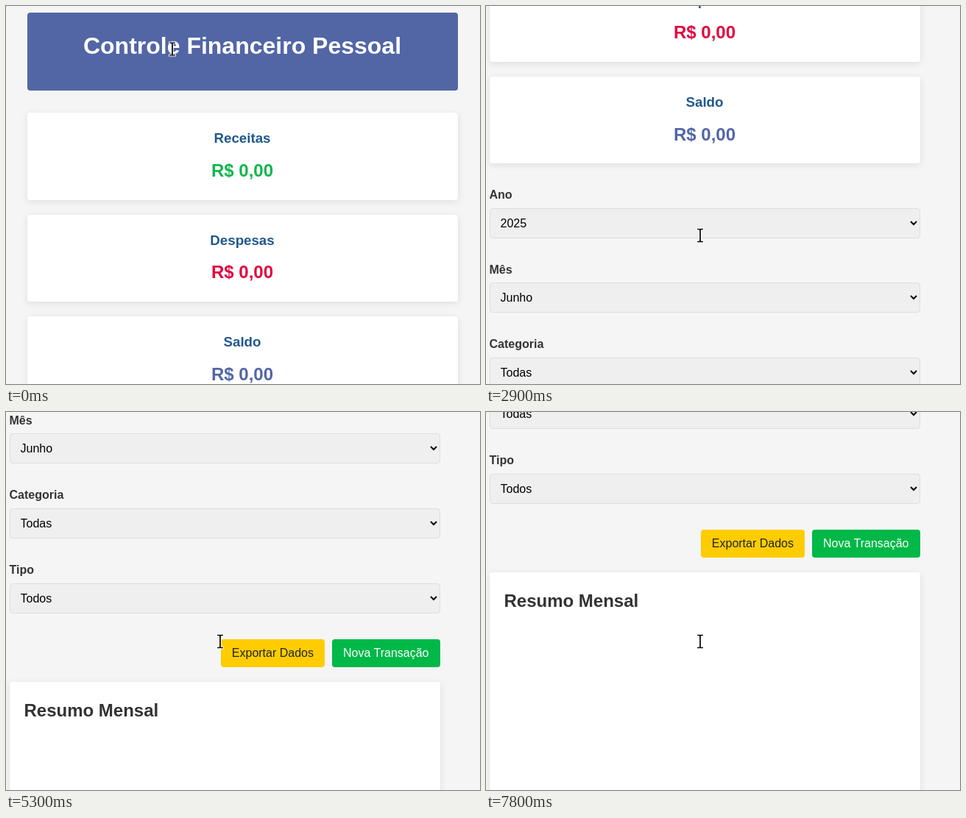
An HTML page for the animation above (8000 ms loop, 644 by 514 pixels).

```html
<!DOCTYPE html>
<html lang="pt-BR">
<head>
<meta charset="utf-8">
<title>Controle Financeiro Pessoal</title>
<style>
* { box-sizing: border-box; margin: 0; }
html, body { width: 100%; height: 100%; overflow: hidden; background: #f5f5f5; }
body { position: relative; font: 16px/1.6 "Liberation Sans", Arial, sans-serif; color: #333; }
#page { position: absolute; left: 28.5px; top: 9px; width: 585px; }
header { height: 106.2px; margin-bottom: 30px; padding: 20px; border-radius: 4px; background: #5266a6; color: #fff; text-align: center; }
h1 { font-size: 32px; }
h2 { font-size: 24px; margin-bottom: 15px; }
h3 { font-size: 18.72px; margin-bottom: 10px; color: #1f598d; }
.card { position: relative; padding: 20px; margin-bottom: 20px; border-radius: 4px; background: #fff; box-shadow: 0 2px 10px rgba(0, 0, 0, .1); }
.total { text-align: center; }
.total p { font-size: 24px; font-weight: bold; }
.filters { padding-top: 10px; }
label { display: block; margin-bottom: 5px; font-weight: bold; }
select { display: block; width: 100%; height: 41px; margin-bottom: 30px; padding: 10px; border: 1px solid #ddd; border-radius: 4px; background-color: #efefef; color: #000; font: 16px "Liberation Sans", Arial, sans-serif; }
.buttons { display: flex; justify-content: flex-end; gap: 10px; margin: 35px 0 20px; }
.buttons span { height: 38px; padding: 0 15px; border-radius: 4px; line-height: 37px; }
.export { background: #fc0; color: #212529; }
.add { background: #00b848; color: #fff; }
.chart { height: 443.4px; }
.days, .legend { position: absolute; display: flex; }
.days { left: 20px; top: 373.8px; gap: 10px; font-size: 12px; }
.legend { left: 0; right: 0; top: 408.2px; justify-content: center; gap: 20px; font-size: 14px; }
.legend span { display: flex; align-items: center; gap: 5px; }
.legend i { width: 15px; height: 15px; border-radius: 3px; }
table { border-collapse: separate; border-spacing: 0; margin-bottom: 20px; }
th, td { padding: 12px 15px; border-bottom: 1px solid #ddd; text-align: left; }
th { background: #f8f9fa; }
td { text-align: center; }
#cursor { position: absolute; left: 0; top: 0; width: 24px; height: 24px; overflow: visible; }
</style>
</head>
<body>
<div id="page">
  <header><h1>Controle Financeiro Pessoal</h1></header>
  <div id="totals"></div>
  <div class="filters" id="filters"></div>
  <div class="buttons"><span class="export">Exportar Dados</span><span class="add">Nova Transação</span></div>
  <section class="card chart">
    <h2>Resumo Mensal</h2>
    <div class="days" id="days"></div>
    <div class="legend">
      <span><i style="background:#00b848"></i>Receitas</span>
      <span><i style="background:#e6003f"></i>Despesas</span>
    </div>
  </section>
  <section class="card">
    <h2>Transações</h2>
    <table>
      <thead><tr id="columns"></tr></thead>
      <tbody><tr><td colspan="6">Nenhuma transação encontrada</td></tr></tbody>
    </table>
  </section>
</div>
<svg id="cursor">
  <defs><path id="stem" d="M-3-8.5H-1L0-7.5 1-8.5H3M0-7.5V7.5M-3 8.5H-1L0 7.5 1 8.5H3"/></defs>
  <g id="beam" fill="none" stroke-linecap="square">
    <use href="#stem" stroke="#fff" stroke-width="3.6"/>
    <use href="#stem" stroke="#000" stroke-width="1.7"/>
  </g>
  <path id="arrow" d="M-5-9V7L-1.5 4 1 9.5 3.5 8.5 1 3H6Z" fill="#000" stroke="#fff"/>
</svg>
<script>
const LOOP = 8000, TICK = 100;
const $ = id => document.getElementById(id);
const fill = (id, items, html) => { $(id).innerHTML = items.map(html).join(''); };

fill('totals', [['Receitas', '#12b64b'], ['Despesas', '#e10640'], ['Saldo', '#5266a6']],
  ([name, color]) => `<div class="card total"><h3>${name}</h3><p style="color:${color}">R$ 0,00</p></div>`);
fill('filters', [['Ano', '2025'], ['Mês', 'Junho'], ['Categoria', 'Todas'], ['Tipo', 'Todos']],
  ([name, value]) => `<label>${name}</label><select tabindex="-1"><option>${value}</option></select>`);
fill('days', Array.from({ length: 30 }, (_, i) => String(i + 1).padStart(2, '0')), day => `<span>${day}</span>`);
fill('columns', ['Data', 'Descrição', 'Categoria', 'Tipo', 'Valor', 'Ações'], name => `<th>${name}</th>`);

const smooth = p => p * p * (3 - 2 * p);

// Scroll gestures: [start time, ticks, scroll position reached]
const gestures = [
  [1400, 2, 24], [1700, 6, 240], [2500, 1, 285], [2900, 1, 326],
  [3100, 2, 376], [3500, 3, 471], [3900, 1, 499], [4100, 2, 539],
  [4500, 1, 586], [5000, 1, 632], [5300, 1, 673], [5500, 1, 715],
  [5700, 4, 915], [6300, 3, 1258], [7000, 6, 890], [7700, 2, 822]
];

function scrollSteps() {
  const steps = [[0, [0, 0]]];
  let from = 0;
  for (const [start, ticks, to] of gestures) {
    for (let i = 0; i < ticks; i++) {
      const y = Math.round(from + (to - from) * smooth((i + 1) / ticks));
      steps.push([start + i * TICK, [-Math.min(24, y), -y]]);
    }
    from = to;
  }
  return steps;
}

// Each step holds until the next one: [time, value]
function playSteps(element, steps, toStyle) {
  const frames = steps.map(([time, value]) => ({ offset: time / LOOP, easing: 'step-end', ...toStyle(value) }));
  frames.push({ ...frames[frames.length - 1], offset: 1 });
  element.animate(frames, { duration: LOOP, iterations: Infinity });
}
const move = ([x, y]) => ({ transform: `translate(${x}px, ${y}px)` });
const fade = opacity => ({ opacity });

playSteps($('page'), scrollSteps(), move);
playSteps($('cursor'), [[0, [226, 58.5]], [500, [271, 185]], [700, [298, 265]], [800, [312, 318]], [900, [291, 312]]], move);
playSteps($('beam'), [[0, 1], [500, 0], [700, 1]], fade);
playSteps($('arrow'), [[0, 0], [500, 1], [700, 0]], fade);
</script>
</body>
</html>
```
